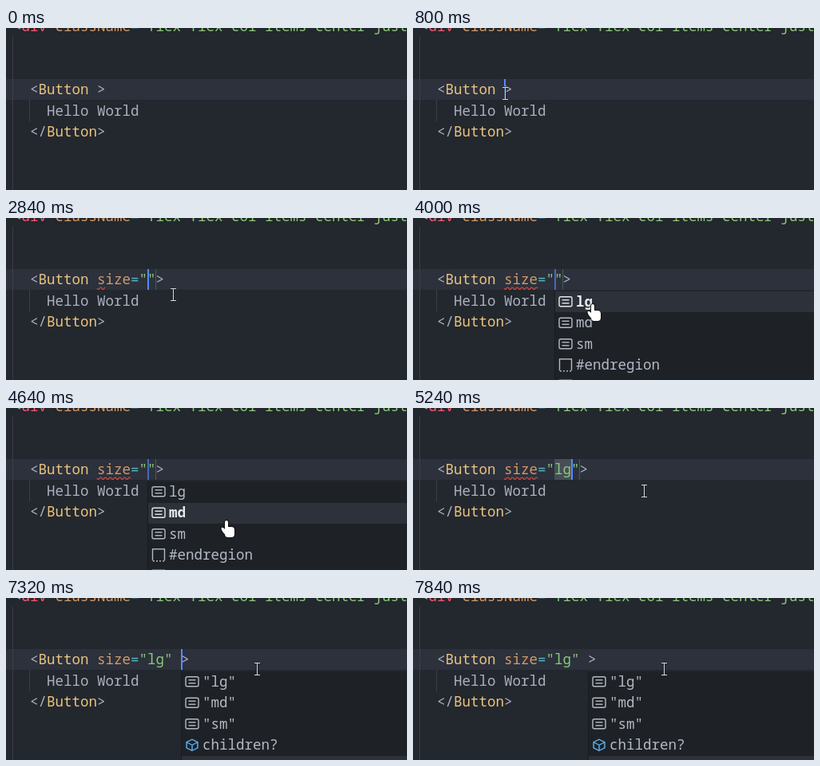
Animation, 502 px wide and 203 px high, one loop 8 s. Source, as an HTML page with a canvas:

```html
<!DOCTYPE html>
<html lang="en">
<head>
<meta charset="utf-8">
<title>Editor completion</title>
<style>
  html, body { margin: 0; width: 100%; height: 100%; overflow: hidden; background: #23272e; }
  canvas { display: block; }
</style>
</head>
<body>
<canvas id="stage" width="502" height="203"></canvas>
<script>
const ctx = document.getElementById('stage').getContext('2d');
const WIDTH = 502, HEIGHT = 203, LOOP = 8000, FRAME = 40;
const CHAR = 10.5, LINE = 26.5, LEFT = 9, LIST_TOP = 92;
const C = {
  bg: '#23272e', line: '#2c313c', guide: '#3a3f48', text: '#abb2bf', tag: '#e9c47e',
  div: '#ef596f', attr: '#d19a66', op: '#56b6c2', str: '#89ca78', caret: '#528bff',
  list: '#1e2227', edge: '#181b20', row: '#2c313a', item: '#b4bac5', focus: '#e6e8ec',
  error: '#d1493f', select: '#484e58', stop: '#50565f', field: '#61b5f5'
};

// What stands before and after the caret from each key press on.
const keys = [
  { at: 720, before: '' },
  { at: 880, before: '' },
  { at: 1520, before: 's' },
  { at: 2480, before: 's' },
  { at: 2720, before: 'size="', after: '"' },
  { at: 3400, before: 'size="', after: '"' },
  { at: 5080, before: 'size="lg', after: '"' },
  { at: 5440, before: 'size="lg" ' },
  { at: 6440, before: 'size="lg" ' },
  { at: 7120, before: 'size="lg" ' }
];

const moves = [
  { from: 80, to: 760, x: 115, y: 82, bendX: -160, bendY: 108 },
  { from: 880, to: 1080, x: 209, y: 96 },
  { from: 3880, to: 4120, x: 240, y: 119 },
  { from: 4280, to: 4760, x: 283, y: 138, bendY: 12 },
  { from: 4880, to: 5040, x: 289, y: 104 },
  { from: 5240, to: 5440, x: 314, y: 89 }
];

const lists = [
  { from: 2160, to: 2720, column: 11, focusAt: 2160, focus: () => 0,
    items: ['size?', 'slot?', 'style?', 'spellCheck?', 'security?'] },
  { from: 3480, to: 5080, column: 16, focusAt: 3920, hand: true,
    focus: mouse => Math.floor((mouse.y - LIST_TOP) / LINE),
    items: ['lg', 'md', 'sm', '#endregion', '#region'] },
  { from: 6840, to: LOOP, column: 20, focusAt: 7160, focus: () => 4,
    items: ['"lg"', '"md"', '"sm"', 'children?', 'className?'] }
];

const col = n => LEFT + n * CHAR;
const baseline = row => 83 + LINE * row;
const between = (t, a, b) => t >= a && t < b;
const clamp = v => Math.min(1, Math.max(0, v));
const ease = u => u * u * (3 - 2 * u);

function mouseAt(t) {
  let x = 506, y = 0;
  for (const m of moves) {
    const u = ease(clamp((t - m.from) / (m.to - m.from)));
    const bend = Math.sin(Math.PI * u);
    x += (m.x - x) * u + (m.bendX || 0) * bend;
    y += (m.y - y) * u + (m.bendY || 0) * bend;
  }
  return { x, y };
}

// Solid after a key press, then a smooth blink of one second.
function blink(age) {
  if (age < 520) return 1;
  const phase = (age - 520) % 1000;
  return phase < 600 ? 1 - ease(clamp(phase / 200)) : ease(clamp((phase - 600) / 200));
}

function rect(x, y, w, h, color) {
  ctx.fillStyle = color;
  ctx.fillRect(x, y, w, h);
}

function line(x1, y1, x2, y2, color, width = 1.4) {
  ctx.strokeStyle = color;
  ctx.lineWidth = width;
  ctx.beginPath();
  ctx.moveTo(x1, y1);
  ctx.lineTo(x2, y2);
  ctx.stroke();
}

function write(x, y, ...tokens) {
  for (const [text, color] of tokens) {
    ctx.fillStyle = color;
    ctx.fillText(text, x, y);
    x += text.length * CHAR;
  }
}

function setFont(weight) {
  ctx.font = `${weight} 17.5px "Noto Sans Mono", "DejaVu Sans Mono", monospace`;
}

function squiggle(x, width) {
  ctx.strokeStyle = C.error;
  ctx.lineWidth = 1.2;
  ctx.beginPath();
  for (let d = 0; d <= width; d++) ctx.lineTo(x + d, 88.2 + 1.4 * Math.sin(d * Math.PI / 3));
  ctx.stroke();
}

// Icons are drawn around their centre.
function valueIcon(color) {
  ctx.beginPath();
  ctx.roundRect(-8, -6, 16, 12, 2);
  ctx.stroke();
  for (const y of [-2, 2]) line(-4.5, y, 4.5, y, color);
}

function snippetIcon(color) {
  for (const x of [-7.5, 7.5]) line(x, -7.5, x, 7, color);
  line(-8, -7.5, 8, -7.5, color);
  ctx.setLineDash([2, 2]);
  line(-7, 7.5, 8, 7.5, color);
  ctx.setLineDash([]);
}

function cubeIcon() {
  ctx.strokeStyle = C.field;
  const corner = i => [8 * Math.sin(i * Math.PI / 3), 7 * Math.cos(i * Math.PI / 3)];
  ctx.beginPath();
  for (let i = 0; i < 6; i++) ctx.lineTo(...corner(i));
  ctx.closePath();
  ctx.stroke();
  for (let i = 0; i < 6; i += 2) line(0, 0, ...corner(i), C.field);
}

function drawIcon(label, x, y, color) {
  const icon = label.endsWith('?') ? cubeIcon : label.startsWith('#') ? snippetIcon : valueIcon;
  ctx.save();
  ctx.translate(x, y);
  ctx.strokeStyle = color;
  ctx.lineWidth = 1.4;
  icon(color);
  ctx.restore();
}

function drawList({ column, items }, focused) {
  const x = Math.floor(col(column));
  rect(x, LIST_TOP, WIDTH - x, HEIGHT - LIST_TOP, C.list);
  rect(x, LIST_TOP, 1, HEIGHT - LIST_TOP, C.edge);
  items.forEach((label, i) => {
    const top = LIST_TOP + LINE * i, middle = top + LINE / 2;
    const active = i === focused, color = active ? C.focus : C.item;
    if (active) rect(x + 1, Math.round(top), WIDTH - x, 26, C.row);
    drawIcon(label, x + 14, middle - .5, color);
    setFont(active ? 700 : 400);
    write(x + 27, middle + 5.5, [label, color]);
  });
}

function drawBackground() {
  rect(0, 0, WIDTH, HEIGHT, C.bg);
  rect(0, 64, WIDTH, 26, C.line);
  rect(8, 11, 1, HEIGHT, C.guide);
  rect(29, 90, 1, 27, C.guide);
  write(col(0), baseline(-3), ['<', C.text], ['div', C.div], [' className', C.attr], ['=', C.op],
    ['"flex flex-col items-center justify-center', C.str]);
  write(col(4), baseline(1), ['Hello World', C.text]);
  write(col(2), baseline(2), ['</', C.text], ['Button', C.tag], ['>', C.text]);
}

function drawTag(t) {
  const key = keys.findLast(k => k.at <= t);
  const { before = '', after = '' } = key || {};
  const [, name, equals, value] = (before + after).match(/^(\w*)(=?)(.*)$/);
  const caretX = col(10 + before.length);

  if (after) {
    const selected = before.length - 'size="'.length;
    rect(caretX - selected * CHAR, 64, selected * CHAR, 26, C.select);
    rect(Math.floor(caretX + CHAR), 64, 1, 26, C.stop);
  }
  write(col(2), baseline(0), ['<', C.text], ['Button ', C.tag], [name, C.attr],
    [equals, C.op], [value, C.str], ['>', C.text]);
  if (between(t, 2040, 5640)) squiggle(col(10), (t < 3240 ? 1 : 4) * CHAR);
  if (key) {
    ctx.globalAlpha = blink(t - key.at);
    rect(Math.round(caretX), 64, 2, 26, C.caret);
    ctx.globalAlpha = 1;
  }
}

function drawBeam() {
  for (const [color, width] of [['#16191d', 2.4], ['#d5d7da', 1.1]]) {
    line(.5, -7, .5, 7, color, width);
    for (const y of [-7.5, 7.5]) line(-3, y, 4, y, color, width);
  }
}

function drawHand() {
  const shape = new Path2D();
  shape.roundRect(-2, 0, 4, 15, 2);
  shape.roundRect(-2, 8, 12, 13, 4);
  shape.ellipse(-3, 13, 2, 5, -.6, 0, 2 * Math.PI);
  ctx.strokeStyle = '#111';
  ctx.lineWidth = 2;
  ctx.stroke(shape);
  ctx.fillStyle = '#fff';
  ctx.fill(shape);
}

function draw(t) {
  const mouse = mouseAt(t);
  const list = lists.find(l => between(t, l.from, l.to));
  setFont(500);
  drawBackground();
  drawTag(t);
  if (list) drawList(list, t < list.focusAt ? -1 : list.focus(mouse));
  if (t < moves[0].from) return;
  ctx.save();
  ctx.translate(Math.round(mouse.x), Math.round(mouse.y));
  if (list && list.hand) drawHand(); else drawBeam();
  ctx.restore();
}

function tick() {
  const t = performance.now() % LOOP;
  draw(Math.floor(t / FRAME) * FRAME);
  requestAnimationFrame(tick);
}
tick();
</script>
</body>
</html>
```
